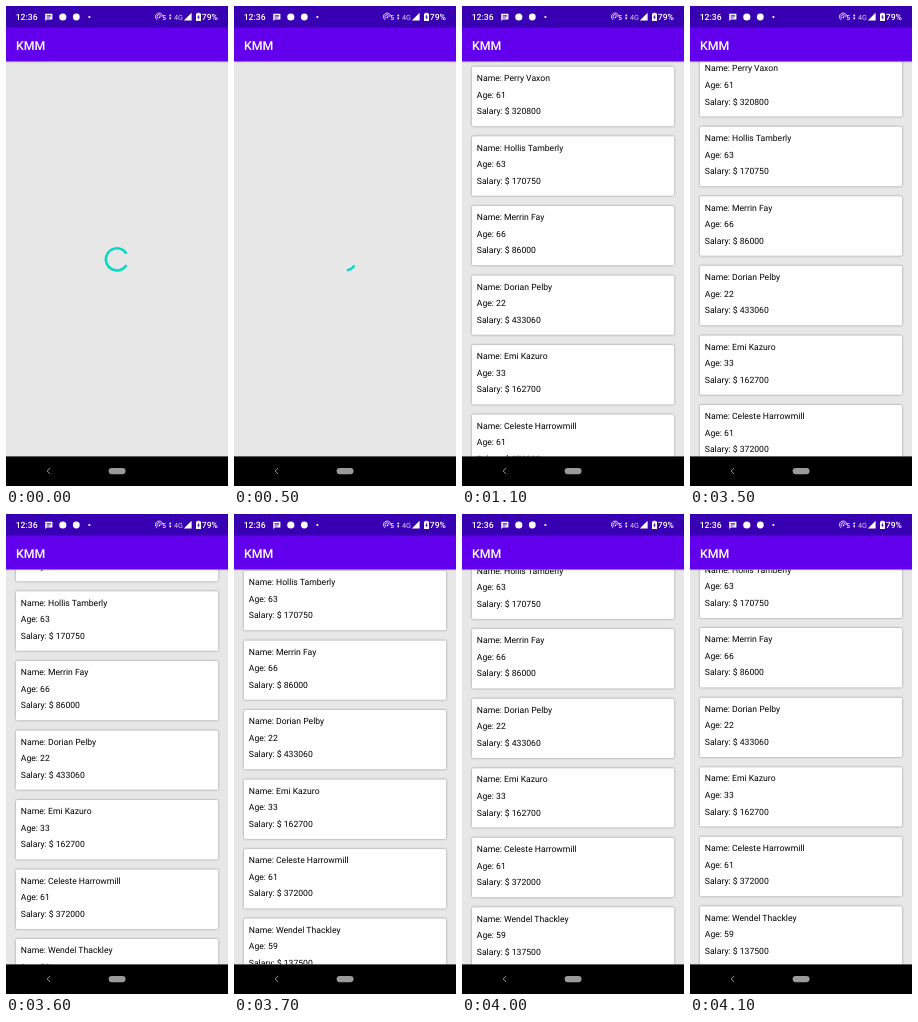
Recreate the animation shown at these times as an HTML page. Size 222 by 480 pixels, loop 4.2 s.

```html
<!DOCTYPE html>
<html lang="en">
<head>
<meta charset="utf-8">
<title>KMM</title>
<style>
  html, body { margin: 0; width: 100%; height: 100%; overflow: hidden; background: #e7e7e7; }
  svg { display: block; width: 100%; height: 100%; }
  text { font: 8.64px Roboto, sans-serif; text-rendering: geometricPrecision; }
  .bar text { fill: #fff; font-weight: 500; }
  .bar .title { font-size: 12.34px; }
  .bar .network { font-size: 7.2px; font-weight: 400; fill: #d9cef2; }
  .bar .band { font-size: 6.6px; }
  .card rect { fill: #fefefe; filter: drop-shadow(0 .9px .8px rgba(0, 0, 0, .4)); }
  .line { fill: none; stroke: #fff; }
</style>
</head>
<body>
<svg viewBox="0 0 222 480">
  <defs>
    <clipPath id="content"><rect y="55.5" width="222" height="395"/></clipPath>
    <linearGradient id="shade" x2="0" y2="1">
      <stop stop-color="#000" stop-opacity=".12"/>
      <stop offset="1" stop-color="#000" stop-opacity="0"/>
    </linearGradient>
  </defs>
  <rect width="222" height="480" fill="#e7e7e7"/>

  <path id="spinner" fill="none" stroke="#03dac5" stroke-width="2.47" pathLength="360"
        d="M0-11.1A11.1 11.1 0 0 1 0 11.1A11.1 11.1 0 0 1 0-11.1"/>
  <g clip-path="url(#content)"><g id="list"></g></g>

  <g class="bar">
    <rect y="55.5" width="222" height="2.2" fill="url(#shade)"/>
    <rect width="222" height="55.5" fill="#6200ee"/>
    <rect width="222" height="21.5" fill="#3700b3"/>
    <text class="title" x="9.9" y="43.8">KMM</text>

    <text x="9.7" y="14">12:36</text>
    <path fill="#fff" d="M39.2 7.8h7.2v5.8h-5.7l-1.5 1.5z"/>
    <path stroke="#3700b3" stroke-width=".7" d="M40.6 9.5h4.5M40.6 10.8h4.5M40.6 12.1h3"/>
    <circle cx="56.8" cy="11" r="3.6" fill="#fff"/>
    <circle cx="70.3" cy="11" r="3.4" fill="#fff"/>
    <circle cx="83.4" cy="11" r="1.1" fill="#fff"/>

    <path class="line" stroke-width=".8" d="M151.2 13.9A3.7 3.7 0 1 1 156.8 10.4M152.2 12.7A2.1 2.1 0 1 1 155.2 10.9"/>
    <circle cx="153.5" cy="11.4" r=".8" fill="#fff"/>
    <text class="band" x="156.2" y="13.8">5</text>
    <path fill="#fff" d="M163 10.3l1.2-2.4 1.2 2.4zM163 11.5h2.4l-1.2 2.4z"/>
    <text class="network" x="168" y="13.8">4G</text>
    <path fill="#fff" d="M177.8 14.6L185.6 6.8v7.8z"/>
    <path fill="#fff" d="M190 7.6h1.4v-.8h2.2v.8h1.4V15h-5z"/>
    <path fill="#3700b3" d="M192.8 8.6l-1.6 3h1.1v2.2l1.6-3h-1.1z"/>
    <text x="195.8" y="14">79%</text>
  </g>

  <rect y="450.4" width="222" height="30" fill="#000"/>
  <path fill="none" stroke="#bbb" stroke-width=".8" d="M44.2 461.9L41.2 465l3 3.1"/>
  <rect x="102.6" y="462" width="17" height="6.2" rx="3.1" fill="#9a9a9a"/>
</svg>

<script>
  const LOOP = 4200, STEP = 100, LOADED = 1100, SCROLL_START = 3500;
  const SCROLL = [9.6, 53, 73.5, 83.7, 83.7, 84.8, 85.8];
  const PITCH = 69.55;
  const people = [
    ["Perry Vaxon", 61, 320800],
    ["Hollis Tamberly", 63, 170750],
    ["Merrin Fay", 66, 86000],
    ["Dorian Pelby", 22, 433060],
    ["Emi Kazuro", 33, 162700],
    ["Celeste Harrowmill", 61, 372000],
    ["Wendel Thackley", 59, 137500]
  ];
  const spinner = document.getElementById("spinner");
  const list = document.getElementById("list");

  list.innerHTML = people.map(([name, age, salary], i) => {
    const lines = [`Name: ${name}`, `Age: ${age}`, `Salary: $ ${salary}`];
    return `<g class="card" transform="translate(9.9 ${60.8 + i * PITCH})">
      <rect width="202.2" height="59.4" rx="1.6"/>
      ${lines.map((line, n) => `<text x="4.9" y="${14.3 + n * 16.55}">${line}</text>`).join("")}
    </g>`;
  }).join("");

  // cubic-bezier(.4, 0, .2, 1)
  function ease(x) {
    if (x <= 0) return 0;
    if (x >= 1) return 1;
    let low = 0, high = 1, u;
    for (let i = 0; i < 20; i++) {
      u = (low + high) / 2;
      const v = 1 - u;
      if (1.2 * u * v * v + 0.6 * u * u * v + u ** 3 < x) low = u; else high = u;
    }
    return u * u * (3 - 2 * u);
  }

  function drawSpinner(t) {
    const CYCLE = 1332, HALF = CYCLE / 2, JUMP = 290, CAPS = 11.4;
    const total = t + 565, turn = Math.floor(total / CYCLE), phase = total % CYCLE;
    const head = JUMP * ease(phase / HALF);
    const tail = JUMP * ease((phase - HALF) / HALF);
    const angle = turn * 216 + 286 * phase / CYCLE + tail;
    spinner.setAttribute("transform", `translate(111 253.4) rotate(${angle})`);
    spinner.setAttribute("stroke-dasharray", `${head - tail + CAPS} 360`);
  }

  function draw(now) {
    const t = Math.floor((now % LOOP) / STEP) * STEP;
    const loaded = t >= LOADED;
    spinner.style.display = loaded ? "none" : "";
    list.style.display = loaded ? "" : "none";
    if (loaded) {
      const offset = t < SCROLL_START ? 0 : SCROLL[(t - SCROLL_START) / STEP];
      list.setAttribute("transform", `translate(0 ${-offset})`);
    } else {
      drawSpinner(t);
    }
  }

  const start = performance.now();
  function tick() {
    draw(performance.now() - start);
    requestAnimationFrame(tick);
  }
  tick();
</script>
</body>
</html>
```
